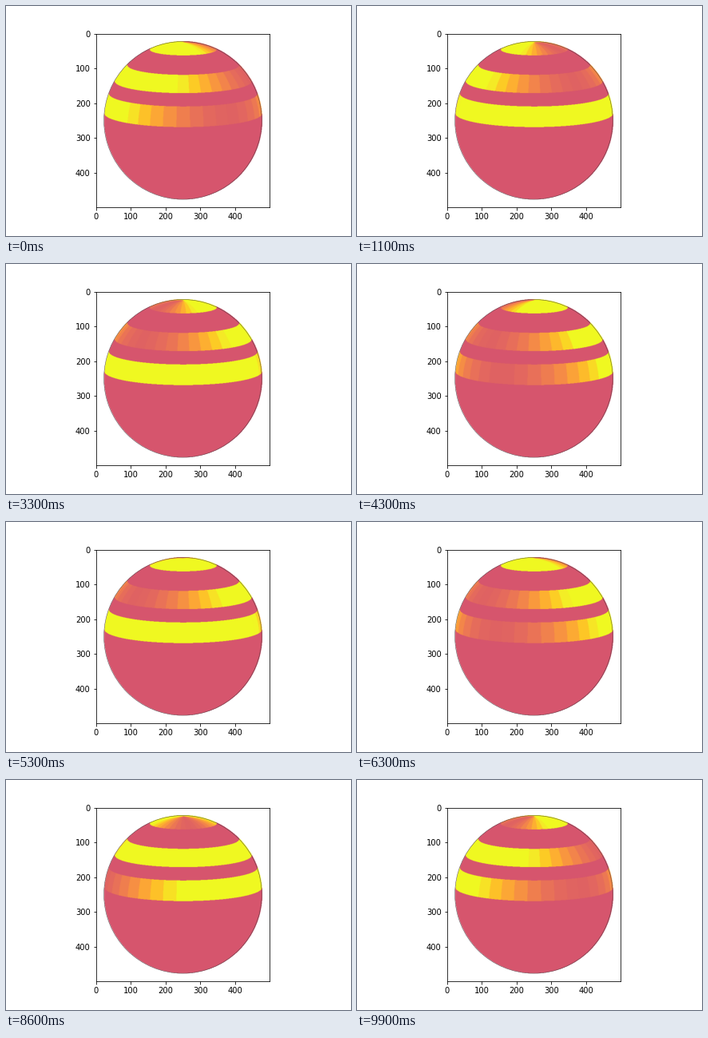
Animation, 432 px wide and 288 px high, one loop 10 s. Source, as a matplotlib script:

```python
import numpy as np
import matplotlib.pyplot as plt
from matplotlib.animation import FuncAnimation
from matplotlib.patches import Circle

FRAMES = 100
SIZE = 500
RADIUS = SIZE / 2 / 1.1
CENTER = (SIZE - 1) / 2
TILT = np.radians(10)
CELL = 10          # longitude cell width, degrees
BASE = 0.55        # colour value of the plain surface
DIP = 0.595        # colour value at the darkest point of a band
CLIP = np.radians(84)

# south edge, north edge, start longitude of the dip, turns per loop
BANDS = [
    (65, 91, 120, -1.5),
    (30, 45, 80, -10),
    (5, 20, 37, -5),
]


def sphere_coords():
    """Latitude and longitude in degrees for each pixel, and the disc mask."""
    row, col = np.mgrid[:SIZE, :SIZE]
    x = (col - CENTER) / RADIUS
    y = (CENTER - row) / RADIUS
    disc = x**2 + y**2 <= 1
    z = np.sqrt(np.clip(1 - x**2 - y**2, 0, 1))
    sin_lat = y * np.cos(TILT) + z * np.sin(TILT)
    front = z * np.cos(TILT) - y * np.sin(TILT)
    lat = np.degrees(np.arcsin(np.clip(sin_lat, -1, 1)))
    lon = np.degrees(np.arctan2(x, front))
    return lat, lon, disc


def brightness(lon, dip_lon):
    wave = 1 - np.cos(np.radians(lon - dip_lon))
    return np.minimum(DIP + (1 - DIP) * wave / (1 - np.cos(CLIP)), 1)


lat, lon, disc = sphere_coords()
cell_lon = np.round(lon / CELL) * CELL
masks = [disc & (lat >= south) & (lat <= north) for south, north, *_ in BANDS]
plasma = plt.get_cmap("plasma")


def render(i):
    value = np.full((SIZE, SIZE), BASE)
    for mask, (_, _, start, turns) in zip(masks, BANDS):
        dip_lon = start + 360 * turns * i / (FRAMES - 1)
        value[mask] = brightness(cell_lon[mask], dip_lon)
    rgb = plasma(value, bytes=True)[..., :3].copy()
    rgb[~disc] = 255
    return rgb


plt.rcParams["font.family"] = "DejaVu Sans"
plt.rcParams["font.size"] = 10
fig, ax = plt.subplots(figsize=(6, 4), dpi=72)
fig.subplots_adjust(left=0.125, right=0.9, bottom=0.125, top=0.88)
image = ax.imshow(render(0))
ax.add_patch(Circle((CENTER, CENTER), RADIUS, fill=False,
                    ec="#403038", lw=0.6, alpha=0.75))
ax.set_xticks(range(0, SIZE, 100))
ax.set_yticks(range(0, SIZE, 100))


def update(i):
    image.set_data(render(i))
    return [image]


anim = FuncAnimation(fig, update, frames=FRAMES, interval=100,
                     repeat=True, repeat_delay=0)
plt.show()
```
